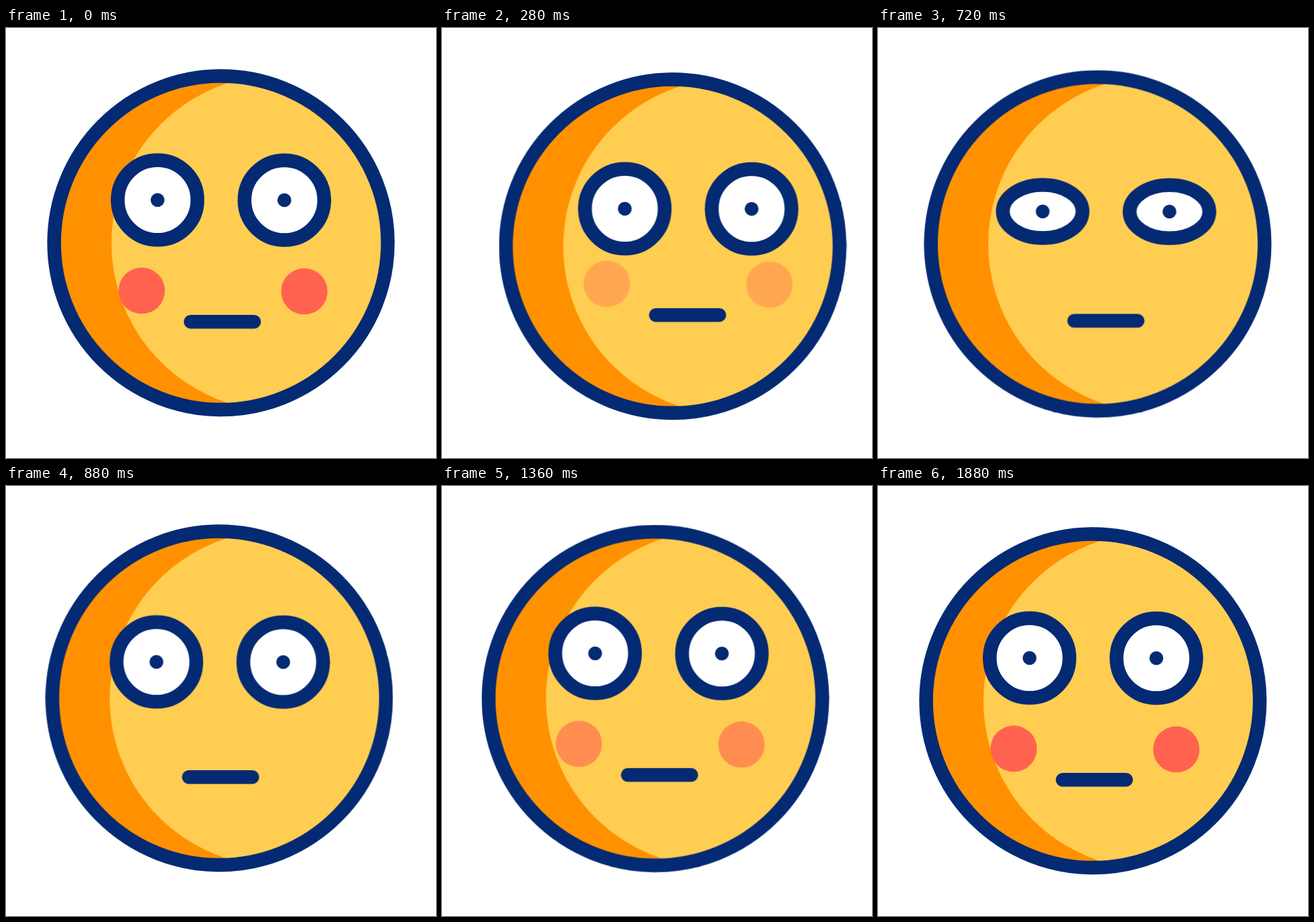
An HTML page that plays this animation: 640x640 px, repeating every 2 s.

```html
<!DOCTYPE html>
<html lang="en">
<head>
<meta charset="utf-8">
<title>Flushed face</title>
<style>
  html, body { margin: 0; width: 100%; height: 100%; overflow: hidden; background: #fff; }
  svg { display: block; width: 100%; height: 100%; }

  .line { fill: none; stroke: #042a74; stroke-width: 20.5; stroke-linecap: round; stroke-linejoin: round; }
  .lid { fill: #fff; }
  .pupil { fill: #042a74; }
  .cheeks { fill: #ff6350; }

  .head, .eyes, .lid, .cheeks, .mouth { animation: 2s linear infinite; }
  .head { animation-name: head; }
  .eyes { animation-name: eyes; }
  .lid { animation-name: blink; }
  .cheeks { animation-name: cheeks, blush; }
  .mouth { animation-name: mouth; }

  @keyframes head {
    0%, 39.15%, 75%, 100% { transform: translate(0, 0); }
    14% { transform: translate(23.5px, 5px); }
    21.65%, 23.35% { transform: translate(36px, 7.6px); }
    50%, 56.65% { transform: translate(-6px, -9px); }
  }
  /* Face parts move relative to the head. */
  @keyframes eyes {
    0%, 56.65%, 93.35%, 100% { transform: translate(0, 0); }
    14% { transform: translate(23px, 8px); }
    21.65%, 23.35% { transform: translate(37.7px, 14.5px); }
    36% { transform: translate(12.3px, 15.5px); }
    42.35% { transform: translate(1px, 11px); }
    52% { transform: translate(0.7px, 4px); }
    68% { transform: translate(4.6px, -3.5px); }
    76.65% { transform: translate(7px, -5.5px); }
  }
  @keyframes blink {
    0%, 15%, 42.35%, 100% { ry: 59.3px; }
    21.65%, 23.35% { ry: 0.1px; }
  }
  @keyframes mouth {
    0%, 41.65%, 56.65%, 93.35%, 100% { transform: translate(0, 0); }
    14% { transform: translate(20px, -15px); }
    21.65%, 23.35% { transform: translate(33.2px, -17.3px); }
    36% { transform: translate(10px, -3px); }
    68% { transform: translate(4px, -3.8px); }
    76.65% { transform: translate(6.5px, -6px); }
  }
  @keyframes cheeks {
    0%, 41.65%, 56.65%, 93.35%, 100% { transform: translate(0, 0); }
    14% { transform: translate(20px, -15.3px); }
    21.65%, 23.35% { transform: translate(33.2px, -22.5px); }
    68% { transform: translate(4px, -3.8px); }
    76.65% { transform: translate(6.5px, -6px); }
  }
  @keyframes blush {
    0%, 80%, 100% { opacity: 1; }
    21.65%, 50% { opacity: 0; }
  }
</style>
</head>
<body>
<svg viewBox="0 0 640 640">
  <clipPath id="disc"><circle cx="320" cy="320" r="248"/></clipPath>
  <g class="head">
    <circle cx="320" cy="320" r="248" fill="#ff9100"/>
    <circle cx="407" cy="320" r="250" fill="#ffcd51" clip-path="url(#disc)"/>
    <circle class="line" cx="319.9" cy="319.8" r="248.3"/>
    <g class="cheeks">
      <circle cx="202" cy="391" r="34.5"/>
      <circle cx="444" cy="392" r="34.5"/>
    </g>
    <path class="line mouth" d="M274.8 437.2H369.2"/>
    <g class="eyes">
      <g transform="translate(225.6 256)">
        <path class="line" d="M-59.3 0H59.3"/>
        <ellipse class="line lid" rx="59.3" ry="59.3"/>
        <circle class="pupil" r="10.3"/>
      </g>
      <g transform="translate(414.3 256.3)">
        <path class="line" d="M-59.3 0H59.3"/>
        <ellipse class="line lid" rx="59.3" ry="59.3"/>
        <circle class="pupil" r="10.3"/>
      </g>
    </g>
  </g>
</svg>
<script>
  // The motion advances in 40 ms steps and rests at the end of each loop.
  const LOOP = 2000, STEP = 40, LAST = 1880;
  const parts = document.getAnimations();
  parts.forEach(part => part.pause());

  function draw() {
    const t = performance.now() % LOOP;
    const time = Math.min(Math.floor(t / STEP) * STEP, LAST);
    parts.forEach(part => { part.currentTime = time; });
    requestAnimationFrame(draw);
  }
  draw();
</script>
</body>
</html>
```
